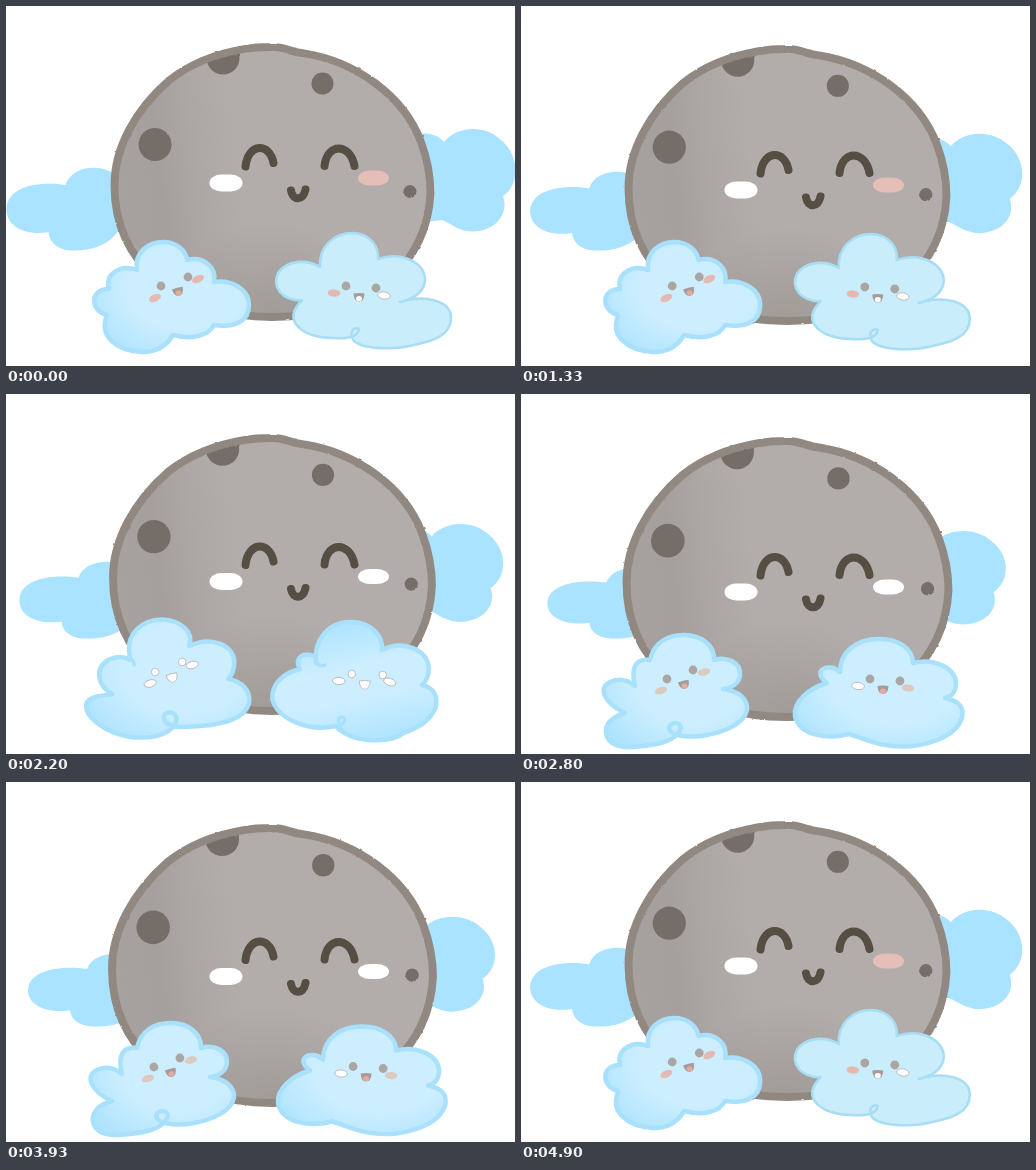
These frames come from a looping animation (509 by 360 pixels, 5000 ms). An HTML page:

```html
<!DOCTYPE html>
<html lang="en">
<head>
<meta charset="utf-8">
<title>Moon and clouds</title>
<style>
html, body { margin: 0; width: 100%; height: 100%; overflow: hidden; background: #fff; }
svg { display: block; width: 100vw; height: 100vh; }
</style>
</head>
<body>
<svg id="stage" viewBox="0 0 509 360">
  <defs>
    <linearGradient id="rock" x1="0" x2="1" y1=".55" y2=".45">
      <stop offset="0" stop-color="#a7a29f"/>
      <stop offset=".15" stop-color="#a5a09d"/>
      <stop offset=".28" stop-color="#ada8a5"/>
      <stop offset=".4" stop-color="#b2adaa"/>
      <stop offset="1" stop-color="#b2adab"/>
    </linearGradient>
    <radialGradient id="shade" cx=".5" cy="1" r=".35">
      <stop offset="0" stop-color="#8f8985" stop-opacity=".5"/>
      <stop offset="1" stop-color="#8f8985" stop-opacity="0"/>
    </radialGradient>
    <radialGradient id="puff" cx=".6" cy=".42" r=".7">
      <stop offset=".55" stop-color="#cceeff"/>
      <stop offset="1" stop-color="#b0e4fe"/>
    </radialGradient>
    <linearGradient id="roll" x1=".2" y1="0" x2=".5" y2="1">
      <stop offset=".12" stop-color="#b2e5fe"/>
      <stop offset=".42" stop-color="#cceeff"/>
      <stop offset=".7" stop-color="#cceeff"/>
      <stop offset="1" stop-color="#b2e5fe"/>
    </linearGradient>
    <filter id="rough" x="-5%" y="-5%" width="110%" height="110%" color-interpolation-filters="sRGB">
      <feTurbulence type="fractalNoise" baseFrequency=".25" numOctaves="1" seed="4"/>
      <feDisplacementMap in="SourceGraphic" scale="2.2" xChannelSelector="R" yChannelSelector="G"/>
    </filter>
    <path id="disc" d="M264 41C278 40 284 46 296 47C350 55 398 90 415 136C422 155 424.500 170 424.500 187C423 222 408 252 382 275C350 302 310 311 266 311C222 311 182 300 150 273C122 248 108.500 216 108.500 180C108 142 130 103 163 74.500C188 54.500 214 47 238 43C250 41 256 41 264 41Z"/>
    <clipPath id="inside"><use href="#disc"/></clipPath>
  </defs>

  <g fill="#aae3ff">
    <path id="backL" d="M130 168C118 162 108 164 104 166C88 158 64 161 58 179C34 175 0 179 -1 203C-1 222 20 230 41 226C42 239 54 245 67 244.500C88 245 103 236 110 226L150 225Z"/>
    <path id="backR" d="M390 135C408 125 428 124 438 136C450 120 479 118 495 134C514 150 514 178 497 190C503 208 490 225 466 225.500C452 225 444 217 436 214C426 216 416 215 390 215Z"/>
  </g>

  <g id="moon" filter="url(#rough)">
    <use href="#disc" fill="url(#rock)"/>
    <use href="#disc" fill="url(#shade)"/>
    <g clip-path="url(#inside)" fill="#756d67">
      <circle cx="149" cy="138.500" r="16.500"/>
      <circle cx="316.500" cy="77.500" r="11"/>
      <circle cx="217" cy="52" r="16.500"/>
      <circle cx="404" cy="185.500" r="6.500"/>
    </g>
    <use href="#disc" fill="none" stroke="#918981" stroke-width="7.800"/>
  </g>

  <g id="face">
    <g fill="none" stroke="#564d43" stroke-width="8" stroke-linecap="round">
      <path d="M239.500 160.500C242 136.500 264 136.500 267.500 157"/>
      <path d="M318.500 160C321 136.500 344 136.500 348.500 160"/>
      <path d="M285 184.500C287 195 297 195 299.500 183.500"/>
    </g>
    <rect x="203.500" y="168.500" width="33" height="17" rx="12" ry="8.500" fill="#fff"/>
    <rect id="blush" x="352" y="164.500" width="31" height="15" rx="12" ry="7.500"/>
  </g>

  <g id="left"></g>
  <g id="right"></g>
</svg>
<script>
const LOOP = 5000, CYCLE = 17, STEP = 4.1;
const $ = id => document.getElementById(id);
const GRAY = '#aba5a3', PINK = '#e6b9b0', TAN = '#dcc9c0', WHITE = '#fff';

const rim = c => c === WHITE ? ' stroke="#b5b1af" stroke-width=".8"' : '';
const eye = (x, y, c = GRAY) =>
  `<circle cx="${x}" cy="${y}" r="${c === WHITE ? 3.8 : 4.4}" fill="${c}"${rim(c)}/>`;
const cheek = (x, y, c, a = 0) =>
  `<ellipse cx="${x}" cy="${y}" rx="6.3" ry="3.6" fill="${c}"${rim(c)} transform="rotate(${a} ${x} ${y})"/>`;
const mouth = (x, y, a = 0, c = '#a79b98', tongue = '#e5aaa0') =>
  `<g transform="translate(${x} ${y}) rotate(${a})"><path d="M-5.500 -3Q0 -4 5.500 -3Q5 5 0 5Q-5 5 -5.500 -3Z" fill="${c}"${rim(c)}/>` +
  `<ellipse cy="2" rx="3" ry="2.600" fill="${tongue}"/></g>`;
const body = (d, fill = 'url(#puff)', w = 4.5, line = '#a9e1fd') =>
  `<path d="${d}" fill="${fill}" stroke="${line}" stroke-width="${w}" stroke-linejoin="round"/>`;
const speck = (x, y, r) => `<circle cx="${x}" cy="${y}" r="${r}" fill="#a9e1fd"/>`;
const stroke = d => `<path d="${d}" fill="none" stroke="#a9e1fd" stroke-width="3.500" stroke-linecap="round"/>`;

const art = {
  wideL: body('M131 264C128 246 143 236 157 236C170 236 180 244 181 254C196 250 211 260 208 276C226 273 243 284 243 299C243 316 228 322 208 319C202 330 186 334 167 329C160 341 148 346 136 346C112 345 92 331 101 309C84 305 83 283 103 283C98 268 115 258 131 264Z') +
    eye(155, 280) + eye(182, 271) + cheek(149, 292, PINK, -25) + cheek(192, 273, PINK, -25) + mouth(172, 285, -15),
  wideR: body('M314 261C313 240 328 227 347 227C364 228 373 240 372 253C396 245 420 257 419 275C417 288 406 293 394 296C420 288 445 295 445 312C445 330 425 335 412 338C392 344 358 344 348 335C343 328 346 320 353 323C352 331 340 333 326 332C298 332 274 315 296 294.500C275 294 266 281 272 267C281 254 300 253 314 261Z', '#caedfc', 2.6, '#a8def4') +
    eye(340, 280) + eye(370, 282) + cheek(328, 287, PINK, 5) + cheek(378, 289.500, WHITE, 8) + mouth(353, 290.500, 0, '#a79b98', WHITE),
  softL: body('M129 256C133 238 147 231 163 231C181 231 194 242 193 256C205 252 220 258 219 271C218 280 210 284 202 285C218 287 227 295 226 306C223 320 203 328 186 331C172 334 150 333 148 324C150 317 160 318 160 324C156 338 135 341 112 343C94 344 84 337 85 326C86 317 94 312 104 309C84 300 76 284 89 278C98 274 107 276 114 282C109 262 116 254 129 256Z') +
    eye(146, 275) + eye(172, 266) + cheek(140, 286.500, TAN, -15) + cheek(183, 268, TAN, -15) + mouth(163, 280, -15),
  softR: body('M319 268C319 248 335 235 358 235C378 235 392 245 392 259C412 254 434 263 435 279C435 288 430 293 424 294C440 297 443 305 441 314C436 330 415 339 392 342C362 345 345 335 328 330C305 336 278 331 274 312C272 298 288 284 306 279C290 268 306 257 319 268Z') +
    eye(349, 275) + eye(379, 277) + cheek(337, 282, WHITE, 5) + cheek(387, 284, TAN, 5) + mouth(362, 285),
  tallL: body('M128 264C122 240 140 225.500 160 225.500C178 226 192 238 187 252C210 241 232 252 232 268C232 276 230 281 226 285C242 288 248 298 247 308C243 328 212 332 182 333C166 334 158 326 163 320C170 315 177 322 173 330C165 342 148 345 128 343C104 339 82 323 84 310C87 302 98 302 110 300C95 292 92 274 106 266C114 262 121 262 128 266Z') +
    stroke('M126 263C129 264 132 267 132 271'),
  tallR: body('M306 268C304 245 318 227 341 227C362 227 374 242 372 255C394 244 418 255 419 273C419 282 416 287 412 290C426 293 428 303 426 312C420 328 405 334 394 338C385 345 370 346 358 345C344 344 332 338 326 331C300 337 268 325 262.500 304C262 288 274 278 290 274C284 262 295 256 306 262Z', 'url(#roll)') +
    stroke('M306 262C306 270 311 272 315 270') + stroke('M326 331C334 331 338 323 332 322C327 323 328 331 333 336') +
    cheek(329, 286, WHITE, 3) + eye(342, 279, WHITE) + mouth(355, 289, 0, WHITE, WHITE) + eye(373, 280, WHITE) + cheek(380, 287, WHITE, 20)
};
const paleFace = eye(153, 278, WHITE) + eye(180, 268, WHITE) + cheek(148, 289.500, WHITE, -15) +
  cheek(190, 271, WHITE, -15) + mouth(170, 283, -15, WHITE, WHITE);
const warmFace = eye(153, 278) + eye(180, 268) + cheek(148, 289.500, PINK, -15) +
  cheek(190, 271, WHITE, -15) + mouth(170, 283, -15);
const drops = speck(225.5, 232.5, 1.7) + speck(290, 257, 2.5) + speck(256, 311, 1.7);

// rest: spread at which each drawing sits in its own coordinates
const poses = [
  { l: art.wideL, r: art.wideR, rest: 0, drop: 0 },
  { l: art.softL, r: art.softR, rest: 24.6, drop: 10 },
  { l: art.softL, r: art.softR + drops, rest: 24.6, drop: 0 },
  { l: art.tallL + paleFace, r: art.tallR, rest: 4.1, drop: 0 },
  { l: art.tallL + warmFace, r: art.tallR, rest: 4.1, drop: 0 }
];
for (const p of poses) {
  for (const [side, key] of [['left', 'l'], ['right', 'r']]) {
    const g = document.createElementNS('http://www.w3.org/2000/svg', 'g');
    g.innerHTML = p[key];
    $(side).append(g);
    p[key] = g;
  }
}

// Ten drawings every 700 ms, the first held longer.
function tick(ms) {
  const u = ms % 700;
  const n = u < 100 ? 0 : 1 + Math.floor((u - 100 + 4) * 3 / 200);
  return Math.floor(ms / 700) * 10 + Math.min(n, 9);
}

const pick = i => i < 4 ? 0 : i < 9 ? 1 : i < 13 ? 2 : i < 15 ? 3 : 4;
const move = (id, x, y, sx = 1, sy = 1) =>
  $(id).setAttribute('transform', `translate(${x} ${y}) scale(${sx} ${sy})`);

function draw(ms) {
  const i = tick(ms) % CYCLE;
  const d = STEP * Math.min(i, CYCLE - i), k = d / 24.6;
  const sl = 1 - .145 * k, sr = 1 - .089 * k;
  const mx = 1 + .0186 * k, my = 1 + .0217 * k;
  move('backL', 1.5 + 1.05 * d, 245 * (1 - sl), 1, sl);
  move('backR', -d, 124 + 14 * k - 124 * sr, 1, sr);
  move('moon', 266.5 * (1 - mx), 37 + 6 * k - 37 * my, mx, my);
  move('face', 0, .855 * d);
  $('blush').setAttribute('fill', i > 3 && i < 15 ? WHITE : '#e5beb7');

  const on = poses[pick(i)];
  for (const p of poses) p.l.style.display = p.r.style.display = p === on ? '' : 'none';
  const off = .46 * (d - on.rest);
  move('left', -off, on.drop);
  move('right', off, on.drop + .12 * (d - on.rest));
}

function run() {
  draw(performance.now() % LOOP);
  requestAnimationFrame(run);
}
run();
</script>
</body>
</html>
```
